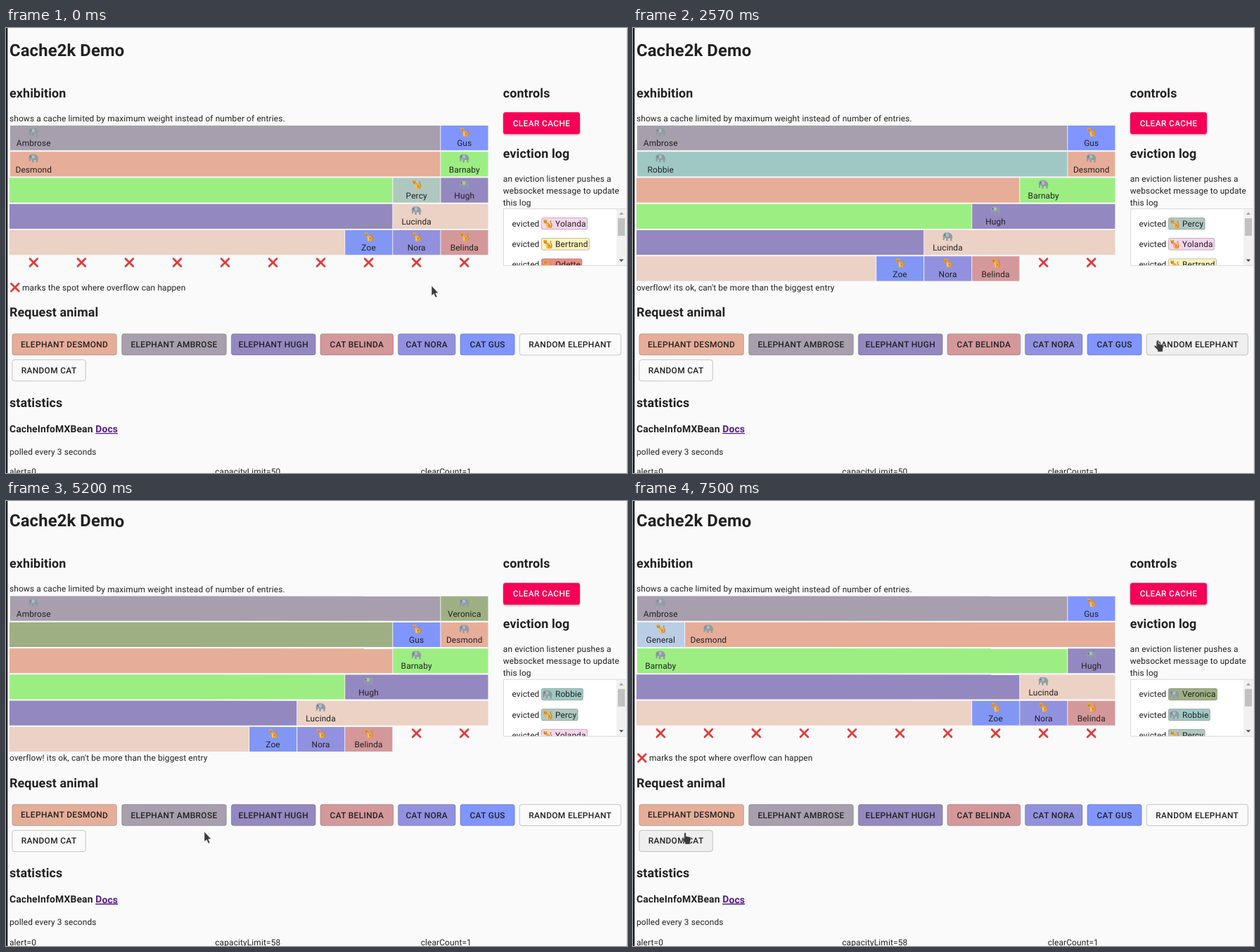
Write an HTML page that moves like this. It is 883 px wide and 634 px high and loops after 8 s.

```html
<!DOCTYPE html>
<html lang="en">
<head>
<meta charset="utf-8">
<title>Cache2k Demo</title>
<style>
  html, body { margin: 0; width: 100%; height: 100%; overflow: hidden; background: #fafafa; }
  svg { display: block; }
  text {
    font: 11.91px Roboto, sans-serif; letter-spacing: .1276px; fill: #212121;
    white-space: pre; text-rendering: geometricPrecision;
  }
  .h1 { font-size: 23.82px; font-weight: 700; }
  .h2 { font-size: 17.86px; font-weight: 700; }
  .h3 { font-size: 13.93px; font-weight: 700; }
  .link { fill: #551a8b; text-decoration: underline; }
  .mid { text-anchor: middle; }
  .btn { font-weight: 500; letter-spacing: .34px; text-anchor: middle; }
  .light { fill: #fff; }
</style>
</head>
<body>
<svg width="883" height="634" viewBox="0 0 883 634">
  <defs>
    <g id="elephant">
      <path fill="#8f9ca3" d="M-7-1Q-6-6-2-5.6Q5-6.4 6.4-1L6.8 2L6 2V6H3.6V2.6H.2V6H-2.4V1.4Q-4.5 1-4.5 3Q-5 5.8-7 4.6Q-5.8 3-7-1Z"/>
      <ellipse cx="-.6" cy="-2" rx="2.1" ry="2.7" fill="#b0bcc2"/>
      <circle cx="-4.3" cy="-2.2" r=".7" fill="#37474f"/>
    </g>
    <g id="cat">
      <path fill="#eda534" d="M-5.6-6.4L-4-5.6H-2.2L-.8-6.4V-2.6Q2.6-1.4 4.4 1.5Q6 3.6 5.6 6.2H-1.2L-2.4-.4Q-5.6-.8-5.6-3.2Z"/>
      <path fill="none" stroke="#d98a29" stroke-width="1.4" stroke-linecap="round" d="M4.5 5.5Q7.2 3 5.2-.4T5-4"/>
      <path fill="#fbc873" d="M-1.8 0L.4 1.2L.2 6.2H-1.1Z"/>
      <path stroke="#543b20" stroke-width="1" d="M-4.8-3.2H-4M-2.4-3.2H-1.6M-3.6-1.8H-2.8M1.8 2.4H2.8"/>
    </g>
    <path id="cross" d="M-5.4-5.4L5.4 5.4M5.4-5.4L-5.4 5.4" stroke="#e23b3b" stroke-width="2.8" stroke-linecap="round"/>
    <path id="arrow" d="M0 0V14.5L3.3 11.7L5.7 17L8.1 16L5.8 10.9L9.7 10.4Z" fill="#3b3b3b" stroke="#fff" stroke-width=".6"/>
    <path id="hand" d="M4.2 1.2Q5.6-.4 7 1.2V5.6L12 6.6Q14.2 7.2 13.9 9.4L12.8 13.4V17H5.4V14.4L.8 10Q0 8.2 1.8 7.8L4.2 9.4Z" fill="#3b3b3b" stroke="#fff" stroke-width=".5"/>
    <filter id="shadow" x="-10%" y="-20%" width="120%" height="160%">
      <feDropShadow dx="0" dy="1.4" stdDeviation="1.2" flood-opacity=".32"/>
    </filter>
    <clipPath id="logClip"><rect x="708" y="258" width="160" height="80"/></clipPath>
  </defs>
  <g id="page"></g>
  <path fill="#1d1e24" d="M0 0h2v634H0z"/>
  <path fill="#b8b8ba" d="M2 0h1v634H2z"/>
  <path fill="#e4e4e4" d="M882 0h1v634h-1z"/>
  <use id="cursor"/>
</svg>
<script>
const LOOP = 8000;
const E = "elephant", C = "cat";

// kind, weight, colour
const animals = {
  Ambrose: [E, 9, "#a79fad"], Gus: [C, 1, "#8095ff"], Desmond: [E, 9, "#e6ae99"],
  Barnaby: [E, 9, "#9cee82"], Percy: [C, 1, "#aec8c0"], Hugh: [E, 9, "#9488c0"],
  Lucinda: [E, 9, "#ecd1c5"], Zoe: [C, 1, "#8297f4"], Nora: [C, 1, "#9291e0"],
  Belinda: [C, 1, "#d4989b"], Robbie: [E, 9, "#9fc8c4"], Veronica: [E, 9, "#9eb083"],
  General: [C, 1, "#b9cee4"], Yolanda: [C, 1, "#f5d5ec"], Bertrand: [C, 1, "#fcf3bc"],
  Odette: [C, 1, "#ec8d84"]
};
const tail = " Barnaby Hugh Lucinda Zoe Nora Belinda";

// Each step: start, end of flash, cached animals, the new one
const gridSteps = [
  { at: 0, names: "Ambrose Gus Desmond Barnaby Percy Hugh Lucinda Zoe Nora Belinda" },
  { at: 1830, end: 2570, fresh: "Robbie", names: "Ambrose Gus Robbie Desmond" + tail },
  { at: 3930, end: 4670, fresh: "Veronica", names: "Ambrose Veronica Gus Desmond" + tail },
  { at: 6500, end: 7500, fresh: "General", freed: true, names: "Ambrose Gus General Desmond" + tail }
];
const logSteps = [
  { at: 0, names: "Yolanda Bertrand Odette" },
  { at: 1830, end: 2570, names: "Percy Yolanda Bertrand" },
  { at: 3930, end: 4670, names: "Robbie Percy Yolanda" },
  { at: 6330, end: 7500, names: "Veronica Robbie Percy" }
];
const buttons = [
  [8.5, 157.8, "Desmond"], [164.3, 313.8, "Ambrose"], [320, 440.6, "Hugh"],
  [446.6, 551.2, "Belinda"], [557.2, 639.5, "Nora"], [645.6, 723.7, "Gus"]
];
const buttonTop = 435.3, buttonPitch = 37, buttonHeight = 31;

// time, x, y
const arrowPath = [[500, 605, 367], [870, 744, 445], [4830, 744, 445], [5200, 282, 471],
  [5330, 153, 479], [5470, 90, 476], [5600, 66, 472]];

const page = document.getElementById("page");
const cursor = document.getElementById("cursor");
const pen = document.createElement("canvas").getContext("2d");
let shown = "";

const clamp = v => Math.max(0, Math.min(1, v));
const ramp = (t, from, to) => clamp((t - from) / (to - from));
const current = (steps, t) => steps.filter(s => t >= s.at).pop();

function flash(step, t) {
  if (!step.end || t >= step.end) return 0;
  return Math.sin(Math.PI * (.1 + .9 * ramp(t, step.at, step.end)));
}

const text = (x, y, str, cls = "") => `<text x="${x}" y="${y}" class="${cls}">${str}</text>`;
const icon = (id, x, y) => `<use href="#${id}" x="${x}" y="${y}"/>`;
const rect = (x, y, w, h, fill, more = "") =>
  `<rect x="${x}" y="${y}" width="${w}" height="${h}" fill="${fill}" ${more}/>`;
const alpha = a => `opacity="${a.toFixed(3)}"`;

const colX = c => 5 + 68.05 * c;
const midX = c => 39.3 + 68.05 * c;
const rowY = r => 139 + 37.25 * r;

function cell(row, from, to, head, fill, glow) {
  const x = colX(from) + (head ? .9 : 0), w = colX(to) - x;
  const box = [x, rowY(row), w, 35.2];
  return rect(...box, fill) + (glow ? rect(...box, "#c2c2c2", alpha(glow * .57)) : "");
}

function grid(t) {
  const step = current(gridSteps, t), glow = flash(step, t);
  let out = "", pos = 0;
  for (const name of step.names.split(" ")) {
    const [kind, weight, fill] = animals[name];
    const start = pos, end = pos + weight, row = Math.floor(start / 10), col = start % 10;
    while (pos < end) {
      const r = Math.floor(pos / 10), stop = Math.min(end, r * 10 + 10);
      out += cell(r, pos % 10, stop - r * 10, pos === start, fill, name === step.fresh ? glow : 0);
      pos = stop;
    }
    out += icon(kind, midX(col), rowY(row) + 9.2) + text(midX(col), rowY(row) + 29.3, name, "mid");
  }
  if (step.freed && glow) out += cell(5, 2, 10, false, "#fafafa", glow);
  const full = pos > 50;
  for (; pos < 60; pos++) out += icon("cross", midX(pos % 10), rowY(5) + 8.9);
  return out + (full
    ? text(5, 373.5, "overflow! its ok, can't be more than the biggest entry")
    : icon("cross", 12.8, 369.6) + text(23, 373.5, "marks the spot where overflow can happen"));
}

function log(t) {
  const step = current(logSteps, t), glow = flash(step, t) * .19;
  pen.font = "11.91px Roboto, sans-serif";
  let items = "";
  step.names.split(" ").forEach((name, i) => {
    const [kind, , fill] = animals[name], y = 29.1 * i;
    const lit = glow > 0 && i === 0;
    const w = 21.5 + pen.measureText(name).width + name.length * .1276;
    if (lit) items += rect(714, 264, 149, 29, "#f50057", alpha(glow));
    items += rect(761.5, 270.4 + y, w, 16.6, fill, 'rx="2.6" stroke="#000" stroke-opacity=".23"');
    if (lit) items += rect(761, 269.9 + y, w + 1, 17.6, "#963c3c", 'rx="2.6" ' + alpha(glow));
    items += text(719.5, 282.8 + y, "evicted") + icon(kind, 770, 278.8 + y) + text(781, 282.8 + y, name);
  });
  return rect(707.5, 257.6, 174.5, 80.9, "#fff", 'stroke="#d3d3d3" stroke-width=".85"') +
    `<g clip-path="url(#logClip)">${items}</g>` +
    rect(868, 258, 14, 80, "#f1f1f1") + rect(870, 271, 10, 25, "#c1c1c1") +
    '<path d="M871.8 266h6.4l-3.2-3.6z" fill="#a3a3a3"/>' +
    '<path d="M871.8 329.5h6.4l-3.2 3.6z" fill="#505050"/>';
}

function button(x1, x2, row, label, fill, hover = 0, ripple = null) {
  const top = buttonTop + buttonPitch * row, w = x2 - x1, h = buttonHeight;
  const box = [x1 + .4, top + .4, w - .8, h - .8];
  let out = rect(...box, fill, 'rx="3.2" stroke="#000" stroke-opacity=".25" stroke-width=".85"');
  if (hover) out += rect(...box, "#000", 'rx="3.2" ' + alpha(hover * .045));
  if (ripple) {
    const [cx, r] = ripple;
    out += `<svg x="${x1}" y="${top}" width="${w}" height="${h}"><circle cx="${cx - x1}" cy="${h / 2}" r="${r}" opacity=".1"/></svg>`;
  }
  return out + text((x1 + x2) / 2, top + 19.6, label, "btn");
}

function controls(t) {
  const overElephant = t < 5200 ? ramp(t, 820, 1070) : 0;
  const overCat = ramp(t, 5470, 5720);
  const pressElephant = t >= 3700 && t < 3930 ? [747, 19] : null;
  const pressCat = t >= 6330 && t < 6500 ? [74, 34] : null;
  return buttons.map(([x1, x2, name]) => {
    const [kind, , fill] = animals[name];
    return button(x1, x2, 0, `${kind} ${name}`.toUpperCase(), fill);
  }).join("") +
    button(729.8, 874.8, 0, "RANDOM ELEPHANT", "#fafafa", overElephant, pressElephant) +
    button(8.5, 113.7, 1, "RANDOM CAT", "#fafafa", overCat, pressCat);
}

function labels(t) {
  return text(5, 39.9, "Cache2k Demo", "h1") +
    text(5, 98.7, "exhibition", "h2") +
    text(5, 132.9, "shows a cache limited by maximum weight instead of number of entries.") +
    text(706.8, 98.7, "controls", "h2") +
    rect(707, 120.1, 109, buttonHeight, "#f50057", 'rx="3.4" filter="url(#shadow)"') +
    text(761.5, 139.7, "CLEAR CACHE", "btn light") +
    text(706.8, 184.8, "eviction log", "h2") +
    text(706.8, 218.8, "an eviction listener pushes a") +
    text(706.8, 235.8, "websocket message to update") +
    text(706.8, 252.8, "this log") +
    text(5, 411, "Request animal", "h2") +
    text(5, 539.6, "statistics", "h2") +
    text(5, 575.9, 'CacheInfoMXBean <tspan class="link">Docs</tspan>', "h3") +
    text(5, 607.8, "polled every 3 seconds") +
    text(5, 636.3, "alert=0") +
    text(297.3, 636.3, "capacityLimit=" + (t < 3930 ? 50 : 58)) +
    text(589.7, 636.3, "clearCount=1");
}

function moveCursor(t) {
  const hand = (t >= 840 && t < 4830) || t >= 5870;
  let x, y;
  if (hand) [x, y] = t < 4830 ? [740.5, 444.3] : [68.5, 472];
  else {
    const i = arrowPath.findIndex(p => p[0] > t);
    const b = arrowPath.at(i), a = arrowPath[i - 1] || b;
    const p = a === b ? 0 : ramp(t, a[0], b[0]);
    const k = p * p * (3 - 2 * p);
    x = a[1] + (b[1] - a[1]) * k;
    y = a[2] + (b[2] - a[2]) * k;
  }
  cursor.setAttribute("href", hand ? "#hand" : "#arrow");
  cursor.setAttribute("x", x);
  cursor.setAttribute("y", y);
}

function draw(t) {
  const scroll = t < 4830 ? 0 : 3.4;
  // The tiny turn stops the browser from snapping baselines to whole pixels.
  page.setAttribute("transform", `translate(0 ${-scroll}) rotate(.004)`);
  const markup = labels(t) + grid(t) + log(t) + controls(t);
  if (markup !== shown) page.innerHTML = shown = markup;
  moveCursor(t);
}

const origin = performance.now();
function tick() {
  draw((performance.now() - origin) % LOOP);
  requestAnimationFrame(tick);
}
tick();
</script>
</body>
</html>
```
